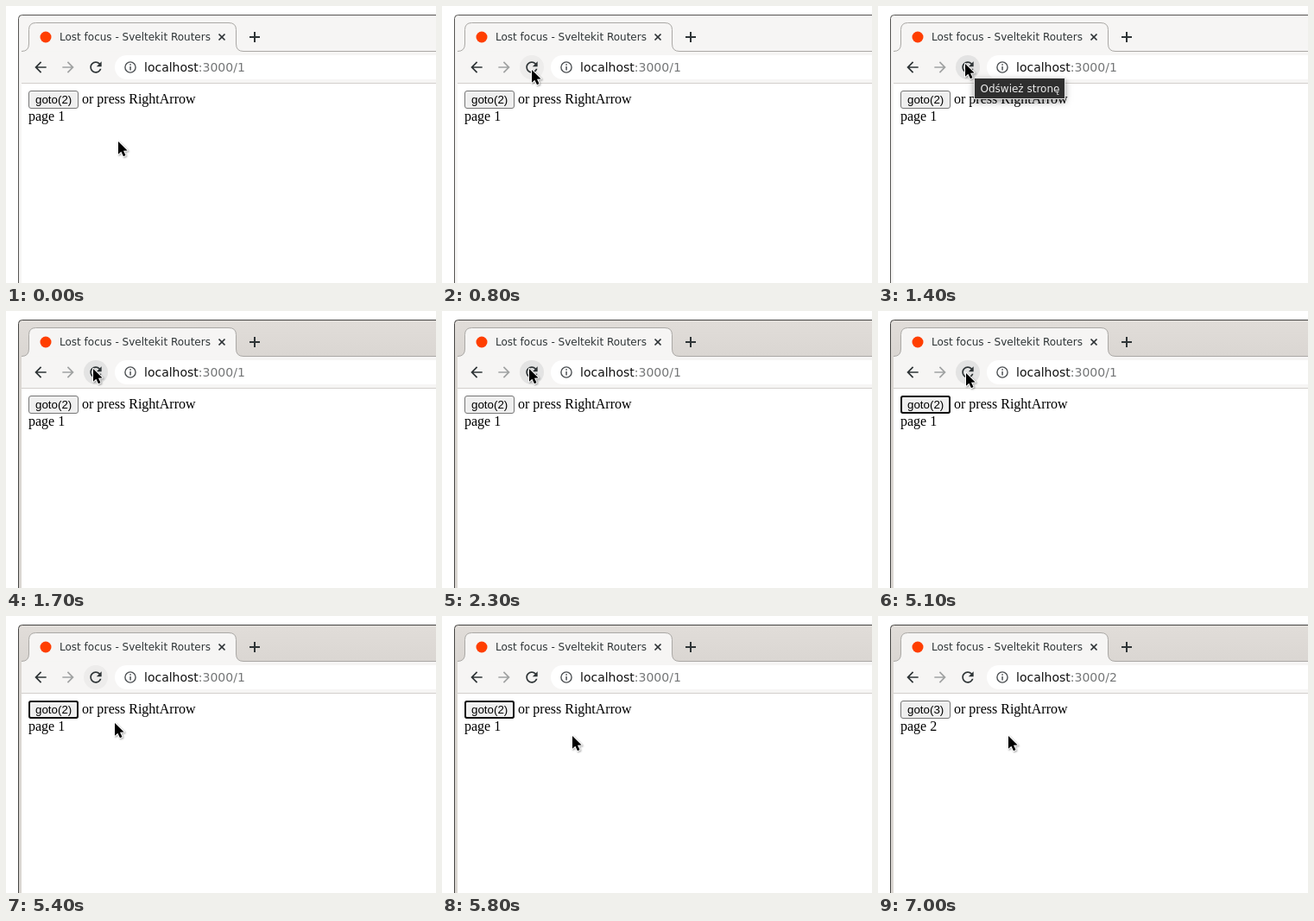
Write an HTML page with a canvas that moves like this. It is 498 by 321 pixels and loops after 8000 ms.

```html
<!DOCTYPE html>
<html lang="en">
<head>
<meta charset="utf-8">
<title>Focus demo</title>
<style>
html, body { margin: 0; width: 100%; height: 100%; overflow: hidden; background: #fff; }
canvas { display: block; width: 498px; height: 321px; }
</style>
</head>
<body>
<canvas id="stage" width="498" height="321"></canvas>
<script>
const W = 498, H = 321, LOOP = 8000;
const ctx = document.getElementById('stage').getContext('2d');

const UI = '"DejaVu Sans", sans-serif';
const SERIF = '"Liberation Serif", "Times New Roman", serif';
const SANS = '"Liberation Sans", Arial, sans-serif';
const INK = '#2e3436';

const ARROW = new Path2D('M20 11H7.83l5.59-5.59L12 4l-8 8 8 8 1.41-1.41L7.83 13H20z');
const RELOAD = new Path2D('M17.65 6.35C16.2 4.9 14.21 4 12 4c-4.42 0-7.99 3.58-7.99 8s3.57 8 7.99 8c3.73 0 6.84-2.55 7.73-6h-2.08c-.82 2.33-3.04 4-5.65 4-3.31 0-6-2.69-6-6s2.69-6 6-6c1.66 0 3.14.69 4.22 1.78L13 11h7V4z');
const POINTER = new Path2D('M0 0V14.8L3.4 11.8L6 17.2L8.5 16.1L6 10.7L10.6 10.5Z');
const TAB = new Path2D('M18 52.5Q26.5 52.5 26.5 44V27.5Q26.5 19.5 34.5 19.5H258Q266.5 19.5 266.5 27.5V44Q266.5 52.5 275 52.5');

// [time, x, y] of the pointer tip; each holds until the next
const POINTER_STEPS = [
  [0, 130, 157], [500, 129, 150], [600, 123, 125], [700, 113, 94], [800, 104, 74], [900, 101, 67],
  [5100, 102, 72], [5200, 107, 88], [5300, 116, 108], [5400, 126, 124], [5500, 140, 138],
  [5600, 149, 144], [5800, 151, 139]
];
const HOVER_STEPS = [[0, 0], [800, 0.5], [900, 1], [5300, 0.75], [5400, 0.5], [5500, 0.2], [5600, 0]];

const hold = (steps, t) => steps.filter(s => s[0] <= t).pop();

function text(str, x, y, font, color) {
  ctx.font = font;
  ctx.fillStyle = color;
  ctx.fillText(str, x, y);
}

function rect(x, y, w, h, color) {
  ctx.fillStyle = color;
  ctx.fillRect(x, y, w, h);
}

function rounded(x, y, w, h, r) {
  ctx.beginPath();
  ctx.roundRect(x, y, w, h, r);
}

function disc(x, y, r, color) {
  ctx.beginPath();
  ctx.arc(x, y, r, 0, Math.PI * 2);
  ctx.fillStyle = color;
  ctx.fill();
}

function line(x1, y1, x2, y2, color, width) {
  ctx.beginPath();
  ctx.moveTo(x1, y1);
  ctx.lineTo(x2, y2);
  ctx.strokeStyle = color;
  ctx.lineWidth = width;
  ctx.stroke();
}

function icon(path, cx, cy, color, flip = 1) {
  const k = 20 / 24;
  ctx.save();
  ctx.translate(cx, cy);
  ctx.scale(k * flip, k);
  ctx.translate(-12, -12);
  ctx.fillStyle = color;
  ctx.fill(path);
  ctx.restore();
}

function drawFrame(active) {
  rect(0, 0, W, H, '#fff');
  const bar = ctx.createLinearGradient(0, 11, 0, 52);
  bar.addColorStop(0, active ? '#e1ddd9' : '#f6f5f4');
  bar.addColorStop(1, active ? '#dad6d2' : '#f6f5f4');
  rounded(14.5, 10.5, W, H, 4);
  ctx.fillStyle = bar;
  ctx.fill();
  ctx.strokeStyle = active ? '#454442' : '#555452';
  ctx.lineWidth = 1;
  ctx.stroke();
  rect(18, 52, W, 38, '#f6f5f4');
  rect(18, 89, W, 1, '#d2cfcc');
  rect(18, 90, W, H, '#fff');
}

function drawTab() {
  ctx.fillStyle = '#f6f5f4';
  ctx.fill(TAB);
  ctx.strokeStyle = '#aaa8a5';
  ctx.lineWidth = 1;
  ctx.stroke(TAB);
  line(275, 52.5, W, 52.5, '#aaa8a5', 1);
  disc(46, 36, 6.5, '#ff3e00');
  text('Lost focus - Sveltekit Routers', 62, 40, '12px ' + UI, INK);
  line(246.5, 32.5, 253.5, 39.5, INK, 1.7);
  line(253.5, 32.5, 246.5, 39.5, INK, 1.7);
  line(282, 36, 294, 36, INK, 2);
  line(288, 30, 288, 42, INK, 2);
}

function drawToolbar(page, hover) {
  if (hover) disc(104, 71, 14, `rgba(46, 52, 54, ${0.09 * hover})`);
  icon(ARROW, 40, 71, INK);
  icon(ARROW, 72, 71, '#a0a2a2', -1);
  icon(RELOAD, 104, 71, INK);

  rounded(126, 57, 420, 28, 14);
  ctx.fillStyle = '#fff';
  ctx.fill();
  ctx.beginPath();
  ctx.arc(144, 71, 6.1, 0, Math.PI * 2);
  ctx.strokeStyle = '#4d5154';
  ctx.lineWidth = 1.4;
  ctx.stroke();
  rect(143.3, 70, 1.5, 4.5, '#4d5154');
  rect(143.3, 67.2, 1.5, 1.6, '#4d5154');

  const font = '14px ' + UI;
  text('localhost', 160, 76, font, '#111');
  text(':3000/' + page, 160 + ctx.measureText('localhost').width, 76, font, '#757778');
}

function drawPage(page, focused) {
  rounded(26.5, 98.5, 57, 20, 2.5);
  ctx.fillStyle = '#efefef';
  ctx.fill();
  ctx.strokeStyle = '#767676';
  ctx.lineWidth = 1;
  ctx.stroke();
  if (focused) {
    rounded(27, 99, 56, 19, 2);
    ctx.strokeStyle = '#101010';
    ctx.lineWidth = 2;
    ctx.stroke();
  }
  text(`goto(${page + 1})`, 34, 113, '13.333px ' + SANS, '#000');
  text('or press RightArrow', 88, 113, '16px ' + SERIF, '#000');
  text('page ' + page, 26, 133, '16px ' + SERIF, '#000');
}

function drawTooltip() {
  ctx.save();
  ctx.shadowColor = 'rgba(0, 0, 0, 0.4)';
  ctx.shadowBlur = 7;
  ctx.shadowOffsetY = 3;
  rect(111, 83, 106, 25, '#e4e4e4');
  ctx.restore();
  rect(112, 84, 104, 23, '#2f2f2f');
  text('Odśwież stronę', 118.5, 100, '12px ' + UI, '#eee');
}

function drawPointer(x, y) {
  ctx.save();
  ctx.translate(x, y);
  ctx.shadowColor = 'rgba(0, 0, 0, 0.35)';
  ctx.shadowBlur = 2;
  ctx.shadowOffsetX = ctx.shadowOffsetY = 1;
  ctx.strokeStyle = '#fff';
  ctx.lineWidth = 2;
  ctx.lineJoin = 'round';
  ctx.stroke(POINTER);
  ctx.shadowColor = 'transparent';
  ctx.fillStyle = '#000';
  ctx.fill(POINTER);
  ctx.restore();
}

function draw(t) {
  const page = t < 7000 ? 1 : 2;
  const [, x, y] = hold(POINTER_STEPS, t);
  drawFrame(t >= 1700);
  drawTab();
  drawToolbar(page, hold(HOVER_STEPS, t)[1]);
  drawPage(page, t >= 4400 && t < 7000);
  if (t >= 1400 && t < 1700) drawTooltip();
  drawPointer(x, y);
}

const start = performance.now();
function tick() {
  draw((performance.now() - start) % LOOP);
  requestAnimationFrame(tick);
}
tick();
</script>
</body>
</html>
```
